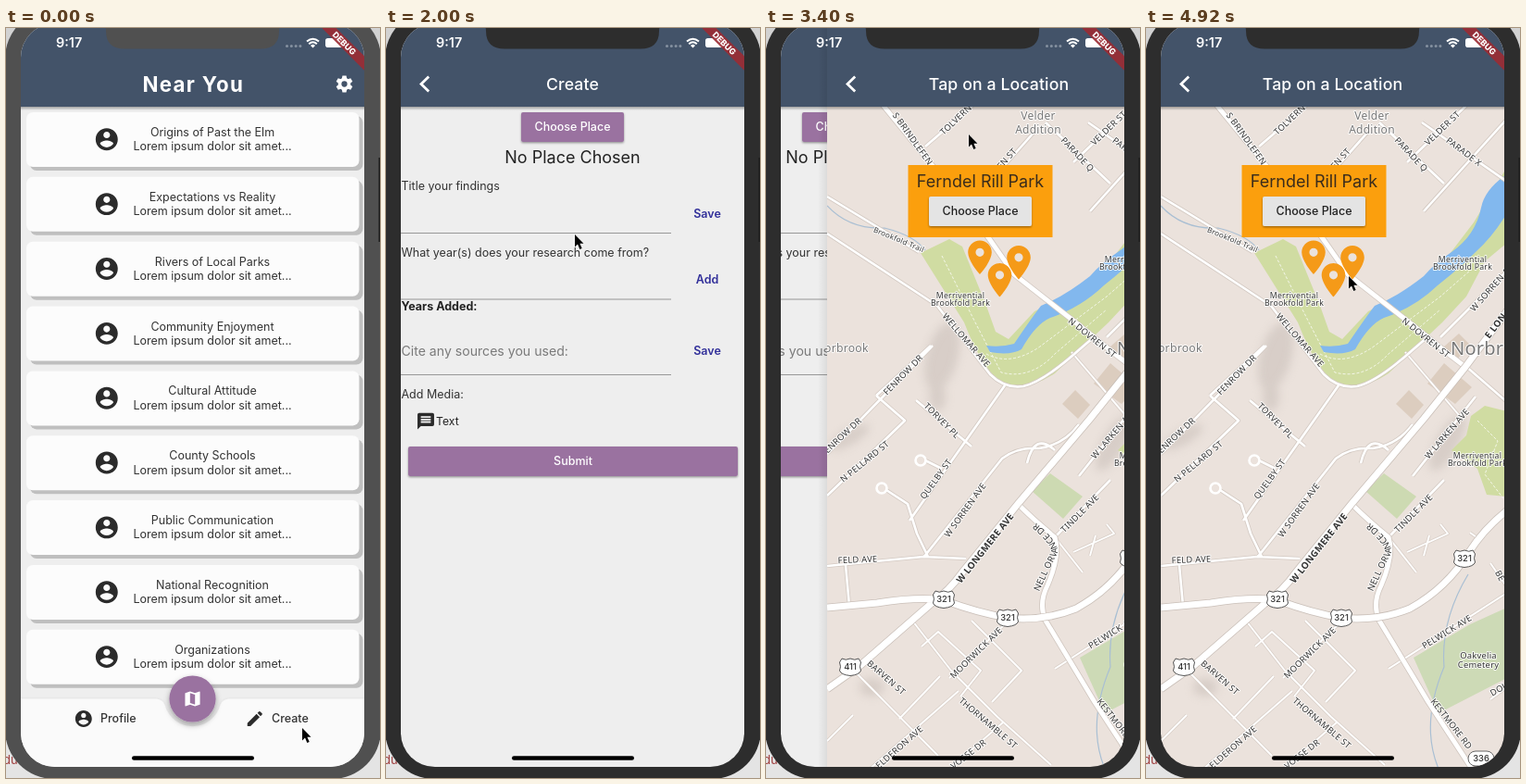
Animation of 404 by 810 pixels, one loop 5000 ms. Source, as an HTML page:

```html
<!DOCTYPE html>
<html lang="en">
<head>
<meta charset="utf-8">
<title>Near You</title>
<style>
html, body { margin: 0; width: 100%; height: 100%; overflow: hidden; background: #d2d2d2; }
svg { display: block; width: 404px; height: 810px; font-family: Inter, Roboto, sans-serif; }
text { white-space: pre; }
.road text { font-family: "Noto Sans", "Open Sans", sans-serif; letter-spacing: .25px;
  stroke: #fff; stroke-width: 2px; stroke-opacity: .85; paint-order: stroke; stroke-linejoin: round; }
</style>
</head>
<body>
<svg id="stage" viewBox="0 0 404 810" xmlns="http://www.w3.org/2000/svg"></svg>
<script>
const LOOP = 5000, WIDTH = 371, K = 0.896;
const NAVY = '#435369', PURPLE = '#9a72a0', INK = '#2b2b2b', ORANGE = '#fb9f0d';

const text = (s, x, y, { size = 12.5, weight = 400, fill = '#333', anchor = 'start', extra = '' } = {}) =>
  `<text x="${x}" y="${y}" font-size="${size}" font-weight="${weight}" fill="${fill}" text-anchor="${anchor}" ${extra}>${s}</text>`;
const mid = (s, x, y, opts) => text(s, x, y, { anchor: 'middle', ...opts });
const rect = (x, y, w, h, fill, r = 0, extra = '') =>
  `<rect x="${x}" y="${y}" width="${w}" height="${h}" rx="${r}" fill="${fill}" ${extra}/>`;
const line = (d, color, width, extra = '') =>
  `<path d="${d}" fill="none" stroke="${color}" stroke-width="${width}" ${extra}/>`;
const area = (d, fill, extra = '') => `<path d="${d}" fill="${fill}" ${extra}/>`;

// 24-unit icons, placed by their centre
const ICONS = {
  person: 'M12 2C6.48 2 2 6.48 2 12s4.48 10 10 10 10-4.48 10-10S17.52 2 12 2zm0 3c1.66 0 3 1.34 3 3s-1.34 3-3 3-3-1.34-3-3 1.34-3 3-3zm0 14.2c-2.5 0-4.71-1.28-6-3.22.03-1.99 4-3.08 6-3.08s5.97 1.09 6 3.08c-1.29 1.94-3.5 3.22-6 3.22z',
  pencil: 'M3 17.25V21h3.75L17.81 9.94l-3.75-3.75L3 17.25zM20.71 7.04a1 1 0 0 0 0-1.41l-2.34-2.34a1 1 0 0 0-1.41 0l-1.83 1.83 3.75 3.75z',
  map: 'M20.5 3L15 5.1 9 3 3.4 4.9Q3 5 3 5.4V20.5Q3 21 3.6 21L9 18.9l6 2.1 5.6-1.9Q21 19 21 18.6V3.5Q21 3 20.5 3zM15 19l-6-2.1V5l6 2.1z',
  message: 'M20 2H4Q2 2 2 4V22l4-4h14q2 0 2-2V4q0-2-2-2zm-2 12H6v-2h12zm0-3H6V9h12zm0-3H6V6h12z',
  pin: 'M12 2C8.13 2 5 5.13 5 9c0 5.25 7 13 7 13s7-7.75 7-13c0-3.87-3.13-7-7-7zm0 9.5a2.5 2.5 0 0 1 0-5 2.5 2.5 0 0 1 0 5z'
};
const icon = (name, x, y, size, fill) =>
  `<path transform="translate(${x} ${y}) scale(${size / 24}) translate(-12 -12)" d="${ICONS[name]}" fill="${fill}" fill-rule="evenodd"/>`;

const gear = (x, y) => `<g transform="translate(${x} ${y}) scale(${K})" fill="#fff"><circle r="7.4"/>` +
  [0, 60, 120].map(a => `<path transform="rotate(${a})" d="M-2.3-10H2.3L3.3-5V5L2.3 10H-2.3L-3.3 5V-5Z"/>`).join('') +
  `<circle r="3.5" fill="${NAVY}"/></g>`;

const button = (label, x, y, w, fill, color) =>
  rect(x, y, w, 32, fill, 2, 'filter="url(#lift)"') + mid(label, x + w / 2, y + 20.4, { weight: 500, fill: color });

const header = title => rect(16, 85, WIDTH, 4, 'url(#drop)') + rect(16, -5, WIDTH, 90, NAVY) + title;
const backHeader = title => header(line('M46.2 52.6L38 60.6L46.2 68.6', '#fff', 2.8) +
  mid(title, 201.5, 67, { size: 17.7, weight: 500, fill: '#fff', extra: 'letter-spacing=".1"' }));

const page = (id, color, content) => `<g id="${id}">${rect(6, -5, 10, 803, 'url(#edge)')}
  <g clip-path="url(#page)">${rect(16, -5, WIDTH, 803, color)}${content}</g></g>`;

function homePage() {
  const titles = ['Origins of Past the Elm', 'Expectations vs Reality', 'Rivers of Local Parks',
    'Community Enjoyment', 'Cultural Attitude', 'County Schools', 'Public Communication',
    'National Recognition', 'Organizations'];
  const card = (title, i) => `<g transform="translate(0 ${i * 69.85})">` +
    rect(26, 95, 359.5, 59, '#bfbfbf', 7) + rect(22, 91, 359.5, 59, '#fcfcfc', 7) +
    icon('person', 108.8, 120.3, 28.7, INK) + mid(title, 223, 117) +
    mid('Lorem ipsum dolor sit amet...', 223, 132.4) + '</g>';
  return page('home', '#eee', titles.map(card).join('') +
    area('M16 724.5H161Q169 724.5 171.5 731A31 31 0 0 0 231.5 731Q234 724.5 242 724.5H387V798H16Z', '#fafafa', 'filter="url(#soft)"') +
    `<g id="press">${rect(247, 730, 94, 32, '#e3e3e3', 2)}</g>` +
    `<circle cx="201.5" cy="724.5" r="25.1" fill="${PURPLE}" filter="url(#float)"/>` +
    icon('map', 201.5, 724.5, 21.5, '#fff') +
    icon('person', 83.8, 746, 21.5, INK) + text('Profile', 102, 750.4, { weight: 500 }) +
    icon('pencil', 268.8, 746, 21.5, INK) + text('Create', 287, 750.4, { weight: 500 }) +
    header(mid('Near You', 202.3, 68.5, { size: 22.3, weight: 700, fill: '#fff', extra: 'letter-spacing="1.3"' }) + gear(365.5, 60.5)));
}

function createPage() {
  const action = (s, y) => mid(s, 347, y, { weight: 600, fill: '#32309a' });
  const rule = y => rect(16, y, 292, 1, '#989898');
  return page('create', '#eee',
    button('Choose Place', 146, 91, 111, PURPLE, '#fff') +
    mid('No Place Chosen', 201.5, 146, { size: 18, fill: '#222' }) +
    text('Title your findings', 16.5, 175.2) + rule(221) + action('Save', 204.6) +
    text('What year(s) does your research come from?', 16.5, 247) + rule(292.5) + action('Add', 276.2) +
    text('Years Added:', 16.5, 305, { weight: 700, fill: '#222' }) +
    text('Cite any sources you used:', 16.5, 353.5, { size: 14.1, fill: '#7a7a7a' }) + rule(374) + action('Save', 352.6) +
    text('Add Media:', 16.5, 400) + icon('message', 43, 424.6, 21.5, INK) +
    text('Text', 54, 429, { size: 12.2, fill: '#222' }) +
    button('Submit', 24, 452, 356, PURPLE, '#fff') + backHeader('Create'));
}

const HIGHWAYS = [
  'M392 303L345 366L300 422L222 514L162 588Q148 608 128 622L50 690L16 714',
  'M16 626L70 621Q115 614 142 618Q180 632 211 637Q250 641 285 627Q325 605 349 566Q365 541 390 521'];
const AVENUES = [
  'M72 78L135 155L190 226L218 266L246 288L278 313L328 353L345 366',
  'M222 514Q240 532 262 550Q268 570 254 602Q244 622 252 640L305 728L352 800'];
const STREETS = [
  'M16 222L135 300L192 374Q208 390 228 387Q250 382 290 346L304 334', 'M16 182L115 242', 'M122 128L180 78',
  'M282 145L352 78', 'M252 102L322 168', 'M298 102L390 166', 'M192 166L240 112', 'M300 198L345 148L390 98',
  'M16 505L100 424L69 397', 'M16 460L130 343', 'M69 397L128 343', 'M105 532L208 386', 'M112 402L172 452',
  'M120 572L205 465Q222 452 245 454Q272 450 288 428', 'M16 581L120 571L166 573', 'M36 580L40 624',
  'M80 499L103 514L113 546L125 571', 'M122 467L140 476', 'M262 550L322 488', 'M288 484L356 398',
  'M318 334L390 262', 'M344 364L390 404', 'M232 470Q240 436 262 456'];
const LANES = [
  'M45 694L136 786', 'M60 802L158 716', 'M108 640L150 694L200 744L258 796', 'M148 702L214 638',
  'M118 668L136 652L182 694L160 722', 'M94 746L138 700', 'M172 640L226 694L194 728', 'M146 802L206 750',
  'M262 692L390 610', 'M372 725L390 712', 'M262 550L292 588', 'M282 566L326 546L318 536', 'M306 548L300 570',
  'M280 350L338 418', 'M372 578L390 604', 'M350 545L360 552', 'M16 770L44 742'];

// name, then start and end of the label's centre line
const LABELS = [
  ['TOLVERN', 138, 115, 172, 83], ['S BRINDLEFEN', 86, 88, 131, 151], ['EN ST', 200, 152, 220, 130],
  ['PARADE Q', 269, 118, 304, 155], ['PARADE X', 323, 118, 364, 149], ['VELDER ST', 298, 129, 342, 87],
  ['N DOVREN ST', 278, 315, 327, 354], ['WELLOMAR AVE', 138, 304, 195, 370], ['FENROW DR', 77, 396, 119, 353],
  ['FENROW DR', 9, 462, 53, 421], ['N PELLARD ST', 27, 492, 86, 444], ['TORVEY PL', 120, 404, 160, 444],
  ['QUELBY ST', 116, 511, 151, 463], ['W SORREN AVE', 143, 551, 187, 490], ['FELD AVE', 25, 575, 73, 573],
  ['BARVEN ST', 61, 685, 99, 718], ['MOORWICK AVE', 149, 702, 205, 647], ['THORNAMBLE ST', 160, 725, 220, 776],
  ['ELDERON AVE', 66, 801, 122, 752], ['VOSSE DR', 148, 800, 189, 768], ['PELWICK AVE', 294, 671, 356, 633],
  ['KESTMORE RD', 307, 722, 353, 781], ['W LARKEN AVE', 300, 467, 350, 409], ['TINDLE AVE', 267, 546, 311, 502],
  ['W SORREN AVE', 350, 307, 400, 250], ['DOL', 372, 719, 390, 709], ['BE', 379, 585, 386, 598]];

function label([name, x1, y1, x2, y2], size = 9.4, weight = 400) {
  const angle = Math.atan2(y2 - y1, x2 - x1) * 180 / Math.PI;
  return `<g transform="translate(${(x1 + x2) / 2} ${(y1 + y2) / 2}) rotate(${angle})">${mid(name, 0, size * .36, { size, weight })}</g>`;
}

function roads(paths, width, casing) {
  const all = paths.join('');
  return line(all, casing, width + 1.6, 'stroke-linejoin="round"') + line(all, '#fff', width, 'stroke-linejoin="round"');
}

const shield = (n, x, y) => `<g transform="translate(${x} ${y})">
  <path d="M-9-9Q-5-6.5 0-9Q5-6.5 9-9L11.5-5Q9.5 0 11.5 4Q10 8.5 0 9.5Q-10 8.5-11.5 4Q-9.5 0-11.5-5Z" fill="#fff" stroke="#555" stroke-width="1"/>
  ${mid(n, 0, 3.4, { size: 9.4, weight: 500 })}</g>`;

const parkName = (x, y) => mid('Merrivential', x, y, { size: 8.7 }) + mid('Brookfold Park', x, y + 8.8, { size: 8.7 });

function mapPage() {
  const hills = [[140, 355, 17, 38, 15], [326, 448, 12, 34, 30], [64, 712, 13, 10, 0], [40, 442, 24, 8, -30], [135, 398, 9, 16, 0]]
    .map(([x, y, rx, ry, a]) => `<ellipse rx="${rx}" ry="${ry}" transform="translate(${x} ${y}) rotate(${a})"/>`).join('');
  const blocks = area('M270 406L284 391L300 407L287 422ZM304 384L322 362L352 388L334 406ZM322 344L338 330L350 342L336 358Z', '#dccdbf');
  const parks = area('M117 243L148 228L162 236L188 300L198 328L212 336L240 306L290 281L328 244L354 210L390 150V232L366 252L346 290L320 318L288 348L262 373Q236 391 208 387Q184 370 164 318Z', '#d0dca2') +
    area('M330 456L346 440L351 419L366 408L390 414V506L368 504L358 476Z', '#d0dca2') +
    area('M237 500L257 481L292 506L271 530Z', '#cddab2') +
    area('M289 680L350 644L390 626V702L316 740Z', '#cddab6');
  const trails = line('M140 246L176 318L204 372Q236 380 262 352L318 304M188 352Q214 366 246 344L318 290L350 262M358 424L380 446L366 482L386 508', '#fff', 1, 'stroke-dasharray="3 2" opacity=".75"');
  const water = line('M16 192Q40 218 78 216Q110 224 122 240M348 590Q318 640 322 690Q296 752 316 800', '#a9bfd3', 1.2) +
    area('M390 158Q366 174 362 194Q356 224 330 242Q312 254 300 268Q272 290 247 300Q237 313 218 341Q204 345 188 343L192 350Q214 354 226 347Q241 320 257 313Q290 302 315 278Q338 260 356 242Q374 226 390 200Z', '#82b8ee');
  const ends = [[75, 497], [117, 467]].map(([x, y]) =>
    `<circle cx="${x}" cy="${y}" r="5.5" fill="#ebe2dc" stroke="#fff" stroke-width="2.6"/>`).join('');
  const pins = [[181, 229.5], [223, 235], [202.5, 254]]
    .map(([x, y]) => icon('pin', x, y + 18.3, 43.9, '#f59a18')).join('');
  const grey = { fill: '#777' };

  return page('map', '#ebe2dc',
    `<g fill="#c4bab4" opacity=".5" filter="url(#blur)">${hills}</g>` + blocks + parks + trails + water +
    roads(LANES, 1.9, '#d9cfc8') + roads(STREETS, 2.6, '#d3c9c2') + ends +
    roads(AVENUES, 5, '#cfc5be') + roads(HIGHWAYS, 7, '#c9bfb8') +
    `<g class="road"><path id="bend" d="M245 609Q256 584 264 569Q269 556 240 533" fill="none"/>
      <text font-size="9.6" fill="#333"><textPath href="#bend">NELL ORVANCE DR</textPath></text>` +
    LABELS.map(l => label(l)).join('') +
    label(['W LONGMERE AVE', 156, 600, 217, 523], 10, 600) + label(['E LON', 367, 335, 388, 308], 10, 600) +
    label(['Brookfold Trail', 66, 217, 121, 240], 8) +
    parkName(160, 291.5) + parkName(342, 252.5) + parkName(358, 464.5) +
    mid('Oakvelia', 359, 680.5, { size: 9.4 }) + mid('Cemetery', 359, 690.5, { size: 9.4 }) +
    mid('Velder', 244, 99, { size: 12, ...grey }) + mid('Addition', 244, 114, { size: 12, ...grey }) +
    text('orbrook', 13, 350, { size: 12.2, ...grey }) + text('Norbr', 329, 353, { size: 20, ...grey }) + '</g>' +
    shield('321', 142, 617) + shield('321', 211, 637) + shield('321', 344, 573) + shield('411', 41, 690) +
    rect(348, 781, 28, 16, '#fff', 8, 'stroke="#666"') + mid('336', 362, 792.4, { size: 9.4, weight: 500 }) +
    pins + rect(103.5, 148, 156, 78, ORANGE) +
    mid('Ferndel Rill Park', 181.5, 171.6, { size: 18, fill: '#3a2c1c' }) +
    button('Choose Place', 126, 182, 111, '#e4e4e4', '#222') + backHeader('Tap on a Location'));
}

function statusBar() {
  const dots = [303.5, 308.3, 313.1, 317.9].map(x => `<circle cx="${x}" cy="19.5" r="1.5" fill="#8591a0"/>`).join('');
  return text('9:17', 54, 21.3, { size: 14.4, weight: 600, fill: '#fff' }) + dots +
    line('M325 14.6Q331.5 8.8 338 14.6M327.2 17.2Q331.5 13.2 335.8 17.2', '#fff', 2) +
    area('M329 19Q331.5 16.7 334 19L331.5 21.5Z', '#fff') +
    rect(345, 11, 20.5, 10, '#fff', 2.8) + rect(366.5, 14.3, 1.5, 3.6, '#fff', .7) +
    `<g transform="translate(387 -5) rotate(45)">` +
    rect(-48, 25, 96, 10.9, '#9c2c34', 0, 'opacity=".9"') +
    mid('DEBUG', 0, 33.7, { size: 9, weight: 800, fill: '#fff' }) + '</g>';
}

const shadow = (id, dy, blur, alpha) => `<filter id="${id}" x="-30%" y="-40%" width="160%" height="190%">
  <feDropShadow dx="0" dy="${dy}" stdDeviation="${blur}" flood-color="#000" flood-opacity="${alpha}"/></filter>`;

const stage = document.getElementById('stage');
stage.innerHTML = `<defs>
  <clipPath id="screen">${rect(16, -5, WIDTH, 803, '#000', 37)}</clipPath>
  <clipPath id="page">${rect(16, -5, WIDTH, 803, '#000')}</clipPath>
  <linearGradient id="drop" x2="0" y2="1"><stop stop-color="#000" stop-opacity=".32"/><stop offset="1" stop-color="#000" stop-opacity="0"/></linearGradient>
  <linearGradient id="edge"><stop stop-color="#000" stop-opacity="0"/><stop offset="1" stop-color="#000" stop-opacity=".08"/></linearGradient>
  <filter id="blur" x="-20%" y="-20%" width="140%" height="140%"><feGaussianBlur stdDeviation="5"/></filter>
  ${shadow('lift', 1.2, 1, .4)}${shadow('float', 3, 3, .35)}${shadow('soft', -.5, 1, .06)}
</defs>` +
  rect(0, 0, 404, 810, '#d2d2d2') + rect(0, 405, 404, 405, '#e4e4e4') + text('du', -3, 795, { size: 13, fill: '#a04040' }) +
  rect(-1, -20, 406, 831, 'currentColor', 53) + rect(402.5, 140, 2, 91, '#1c1c1c') +
  `<g clip-path="url(#screen)">${homePage()}${createPage()}${mapPage()}` +
  statusBar() + rect(136, 786.3, 132, 4.4, '#000', 2.2) + '</g>' +
  area('M100-6Q108-5 108 3Q108 22.5 128 22.5H275Q295 22.5 295 3Q295-5 303-6Z', 'currentColor') +
  `<path id="cursor" d="M0 0V13.4L3 10.6L5.3 15.9L7.7 14.9L5.4 9.7H9.5Z" fill="#000" stroke="#fff" stroke-width="1" paint-order="stroke"/>`;

const part = Object.fromEntries(['home', 'create', 'map', 'press', 'cursor'].map(id => [id, document.getElementById(id)]));
const ramp = (t, start, length) => Math.min(1, Math.max(0, (t - start) / length));
const easeOut = u => 1 - (1 - u) ** 3;
const smooth = u => u * u * (3 - 2 * u);
const move = (el, x, y = 0) => el.setAttribute('transform', `translate(${x} ${y})`);

// a page enters from the right and drifts left beneath the next one
function slide(el, enter, leave) {
  move(el, WIDTH * (1 - enter) - WIDTH / 3 * leave);
  el.setAttribute('visibility', enter > 0 && leave < 1 ? 'visible' : 'hidden');
}

// start time, duration, resting point
const MOVES = [[100, 400, 319, 748], [1240, 700, 204, 223], [2020, 700, 219, 115], [3420, 400, 219, 118], [4040, 820, 219, 268]];

function cursorAt(t) {
  let x = 320, y = 756;
  for (const [start, length, toX, toY] of MOVES) {
    const u = smooth(ramp(t, start, length));
    x += (toX - x) * u;
    y += (toY - y) * u;
  }
  return [x, y];
}

function draw(t) {
  const toCreate = easeOut(ramp(t, 960, 600)), toMap = easeOut(ramp(t, 2980, 864));
  const bezel = Math.round(80 - 35 * ramp(t, 200, 200));
  stage.style.color = `rgb(${bezel},${bezel},${bezel})`;
  slide(part.home, 1, toCreate);
  slide(part.create, toCreate, toMap);
  slide(part.map, toMap, 0);
  part.press.setAttribute('opacity', ramp(t, 600, 120) - ramp(t, 960, 200));
  move(part.cursor, ...cursorAt(t));
}

const began = performance.now();
function tick() {
  draw((performance.now() - began) % LOOP);
  requestAnimationFrame(tick);
}
tick();
</script>
</body>
</html>
```
